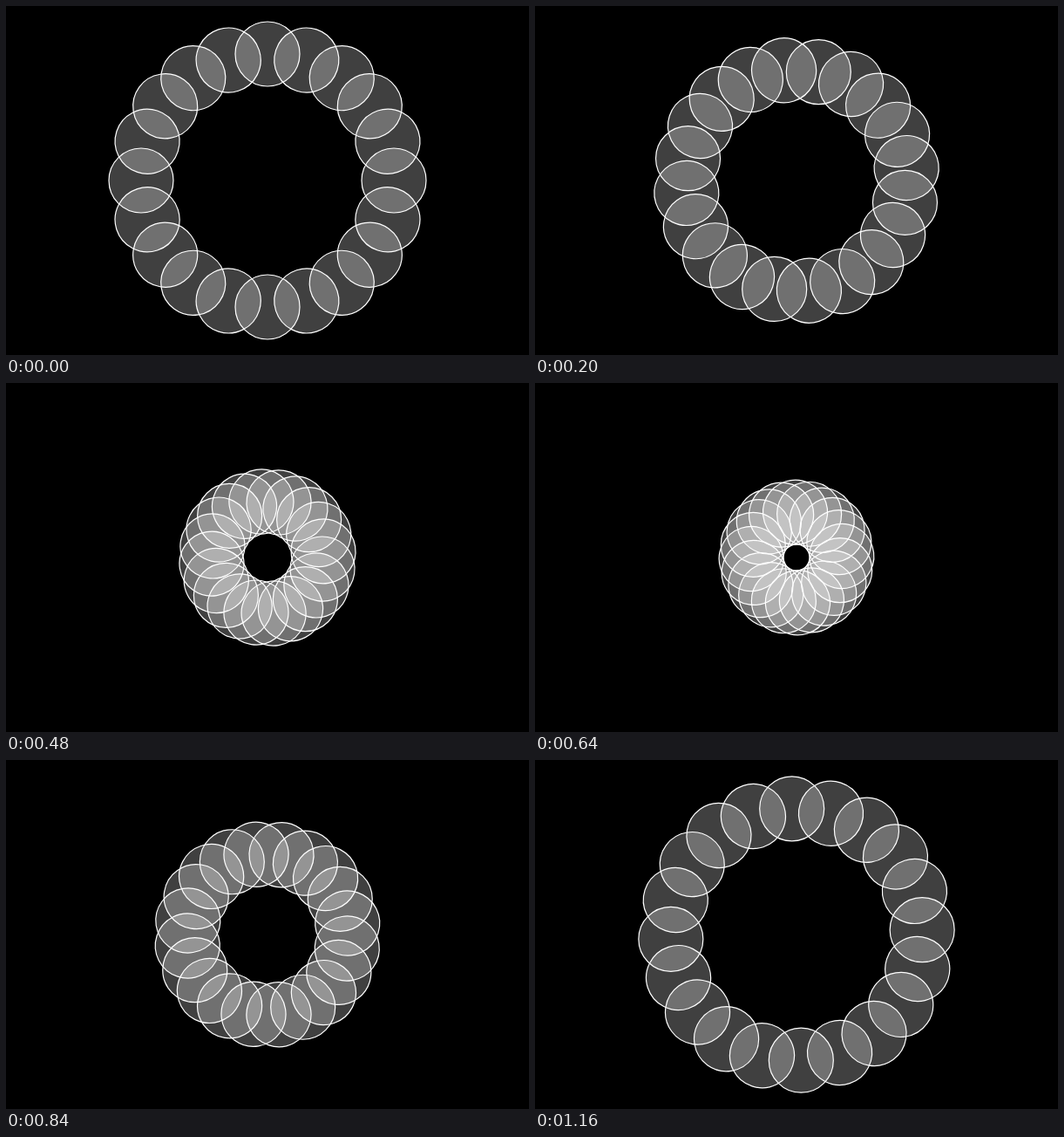
Animation, 600 px wide and 400 px high, one loop 1200 ms. Source, as an HTML page:

```html
<!DOCTYPE html>
<html lang="en">
<head>
<meta charset="utf-8">
<title>Ring of circles</title>
<style>
  html, body { margin: 0; width: 100%; height: 100%; overflow: hidden; background: #000; }
  svg { display: block; width: 100vw; height: 100vh; }
  circle { fill: #fff; fill-opacity: .25; stroke: #fff; stroke-width: 1.2; }
</style>
</head>
<body>
<svg viewBox="0 0 600 400"><g id="ring" transform="translate(300 200)"></g></svg>
<script>
  const LOOP = 1200, STEP = 40, COUNT = 20, RADIUS = 37;
  const ring = document.getElementById('ring');

  const circles = Array.from({ length: COUNT }, (_, i) => {
    const c = document.createElementNS('http://www.w3.org/2000/svg', 'circle');
    c.setAttribute('r', RADIUS);
    c.setAttribute('transform', `rotate(${i * 360 / COUNT})`);
    return ring.appendChild(c);
  });

  // Each circle runs along half of a flat oval; the ovals are fanned out around the centre.
  function draw(ms) {
    const t = Math.floor((ms % LOOP) / STEP) * STEP;
    const a = Math.PI * t / LOOP;
    const along = 143.7 * Math.cos(a) + 1.3 * Math.cos(3 * a);
    const across = 50.2 * Math.sin(a) + 0.2 * Math.sin(3 * a);
    for (const c of circles) {
      c.setAttribute('cx', across);
      c.setAttribute('cy', -along);
    }
  }

  const start = performance.now();
  function tick() {
    draw(performance.now() - start);
    requestAnimationFrame(tick);
  }
  tick();
</script>
</body>
</html>
```
